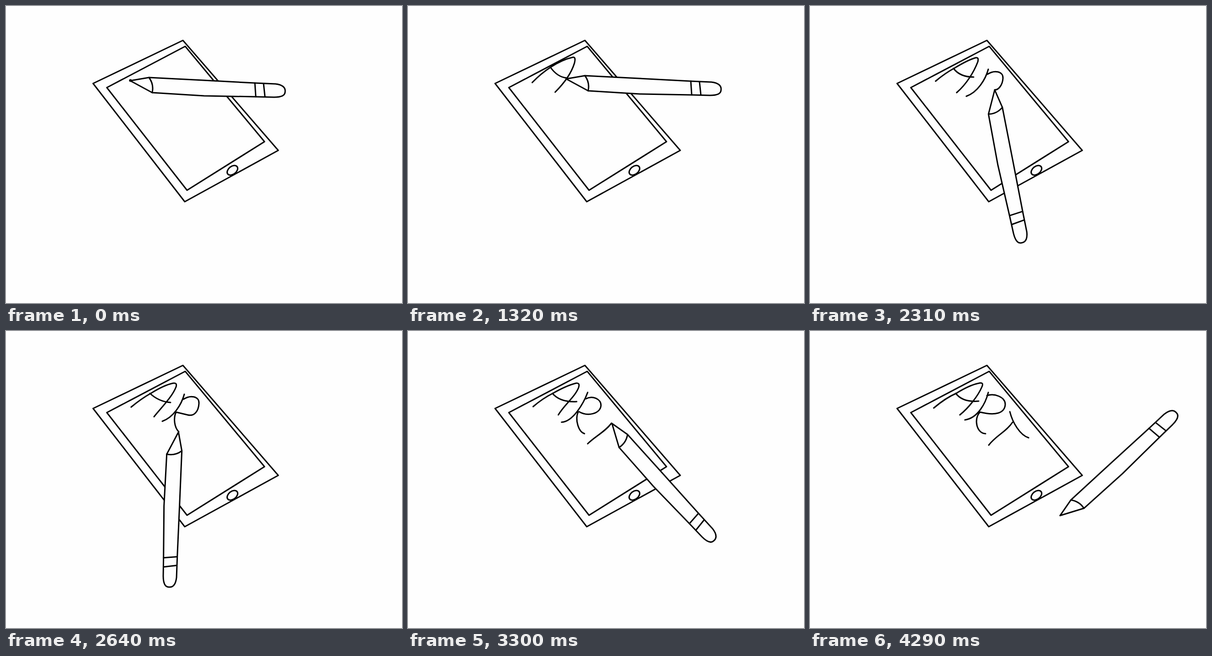
Write an HTML page without scripts that moves like this. It is 864 by 648 pixels and loops after 4.95 s.

```html
<!DOCTYPE html>
<html lang="en">
<head>
<meta charset="utf-8">
<title>Tablet and pen</title>
<style>
  html, body { margin: 0; width: 100%; height: 100%; overflow: hidden; background: #fefefe; }
  svg { display: block; width: 864px; height: 648px; }
  svg, .ink { fill: none; stroke: #000; stroke-width: 3; stroke-linecap: round; stroke-linejoin: round; }
  .pose { visibility: hidden; animation: pose 4950ms step-end calc(var(--i) * 330ms) infinite; }
  .last { animation-name: hold; }
  @keyframes pose { 0% { visibility: visible; } 6.66667%, 100% { visibility: hidden; } }
  @keyframes hold { 0% { visibility: visible; } 13.33333%, 100% { visibility: hidden; } }
</style>
</head>
<body>
<svg viewBox="0 0 864 648">
  <defs>
    <!-- pen lies along +x with its tip at the origin -->
    <g id="pen">
      <path fill="#fefefe" d="M0 0L41 -7L159 -1L272 5L317 7C333 9 339 15 338 24C338 33 327 36 314 36L274 35L161 33L48 26Z"/>
      <path d="M41 -7Q52 8 48 26M272 5L274 35M291 7L294 35"/>
    </g>

    <path id="a-open" d="M271 167C295 142 328 119 359 112Q367 110 363 125C356 148 338 171 321 188"/>
    <path id="a-first" d="M274 164Q294 147 316 135Q344 118 361 113Q369 111 366 122C358 143 342 170 320 189M313 136Q327 155 357 155"/>
    <path id="a-second" d="M273 166Q296 147 316 136Q345 118 364 114Q374 112 371 122C363 143 340 166 323 187M314 136Q333 154 359 156"/>
    <path id="r-stem" d="M341 197C366 188 383 160 389 138"/>
    <g id="ar">
      <path d="M273 165Q294 147 316 136Q346 119 366 114Q376 112 372 124C364 144 340 162 328 183M315 136Q332 156 368 154"/>
      <path d="M335 199C360 198 383 158 392 134M388 148C402 140 422 148 421 163C419 181 392 187 373 176M371 177C364 194 372 220 385 224"/>
    </g>
    <g id="ar-final">
      <path d="M270 168Q296 146 319 136Q348 118 368 114Q380 111 375 122C367 141 346 168 327 183M318 136Q333 156 368 153"/>
      <path d="M338 194C366 190 383 158 389 134M386 141C402 135 426 144 426 160C425 180 404 185 371 177C356 192 364 224 383 224"/>
      <path d="M390 249C406 228 428 220 442 199"/>
    </g>
    <path id="t-bar" d="M436 176C442 200 458 227 477 233"/>
  </defs>

  <g id="tablet">
    <path d="M190 169L386 75L594 315L390 427Z"/>
    <path d="M220 178L391 88L564 296L395 402Z"/>
    <ellipse rx="13" ry="8.5" transform="translate(494 358.5) rotate(-38)"/>
  </g>

  <g class="pose" style="--i:0">
    <use href="#pen" transform="translate(271 163)"/>
    <circle cx="271.5" cy="162.5" r="1.5"/>
  </g>
  <g class="pose" style="--i:1">
    <path d="M270 165Q280 152 293 143"/>
    <use href="#pen" transform="translate(293.5 142) rotate(30)"/>
  </g>
  <g class="pose" style="--i:2">
    <path d="M270 165C284 146 332 121 362 113"/>
    <use href="#pen" transform="translate(362.3 112.8) rotate(81)"/>
  </g>
  <g class="pose" style="--i:3">
    <path d="M271 167C295 142 328 119 359 112Q367 110 363 125C357 145 347 158 338 170"/>
    <use href="#pen" transform="translate(338 170) rotate(104.5)"/>
  </g>
  <g class="pose" style="--i:4">
    <use href="#a-open"/>
    <path d="M311 134Q326 155 346 157"/>
    <use href="#pen" transform="translate(345 159)"/>
  </g>
  <g class="pose" style="--i:5">
    <use href="#a-open"/>
    <path d="M311 134Q326 155 356 156"/>
    <use href="#pen" transform="translate(342 197) rotate(45)"/>
  </g>
  <g class="pose" style="--i:6">
    <use href="#a-first"/>
    <path d="M341 198Q358 193 383 154"/>
    <use href="#pen" transform="translate(383.5 154) rotate(30)"/>
  </g>
  <g class="pose" style="--i:7">
    <use href="#a-first"/>
    <use href="#r-stem"/>
    <path d="M387 149C402 139 422 142 421 158C420 172 412 183 403 183"/>
    <use href="#pen" transform="translate(403 183) rotate(76)"/>
  </g>
  <g class="pose" style="--i:8">
    <use href="#a-second"/>
    <use href="#r-stem"/>
    <path d="M387 149C402 139 422 142 421 158C420 176 410 187 396 183L371 177C365 190 367 210 377 220"/>
    <use href="#pen" transform="translate(376.3 220.5) rotate(89.5)"/>
  </g>
  <g class="pose" style="--i:9">
    <use href="#ar"/>
    <use href="#pen" transform="translate(393 245) rotate(37)"/>
  </g>
  <g class="pose" style="--i:10">
    <use href="#ar"/>
    <path d="M392 246C408 230 430 220 444 201"/>
    <use href="#pen" transform="translate(445 201.8) rotate(45)"/>
  </g>
  <g class="pose" style="--i:11">
    <use href="#ar-final"/>
    <use href="#pen" transform="translate(435.5 177.5) rotate(41.5)"/>
  </g>
  <g class="pose" style="--i:12">
    <use href="#ar-final"/>
    <use href="#t-bar"/>
    <use href="#pen" transform="translate(478 233) rotate(41)"/>
  </g>
  <g class="pose last" style="--i:13">
    <use href="#ar-final"/>
    <use href="#t-bar"/>
    <use href="#pen" transform="translate(545.5 402.8) rotate(-45.5)"/>
  </g>
</svg>
</body>
</html>
```
